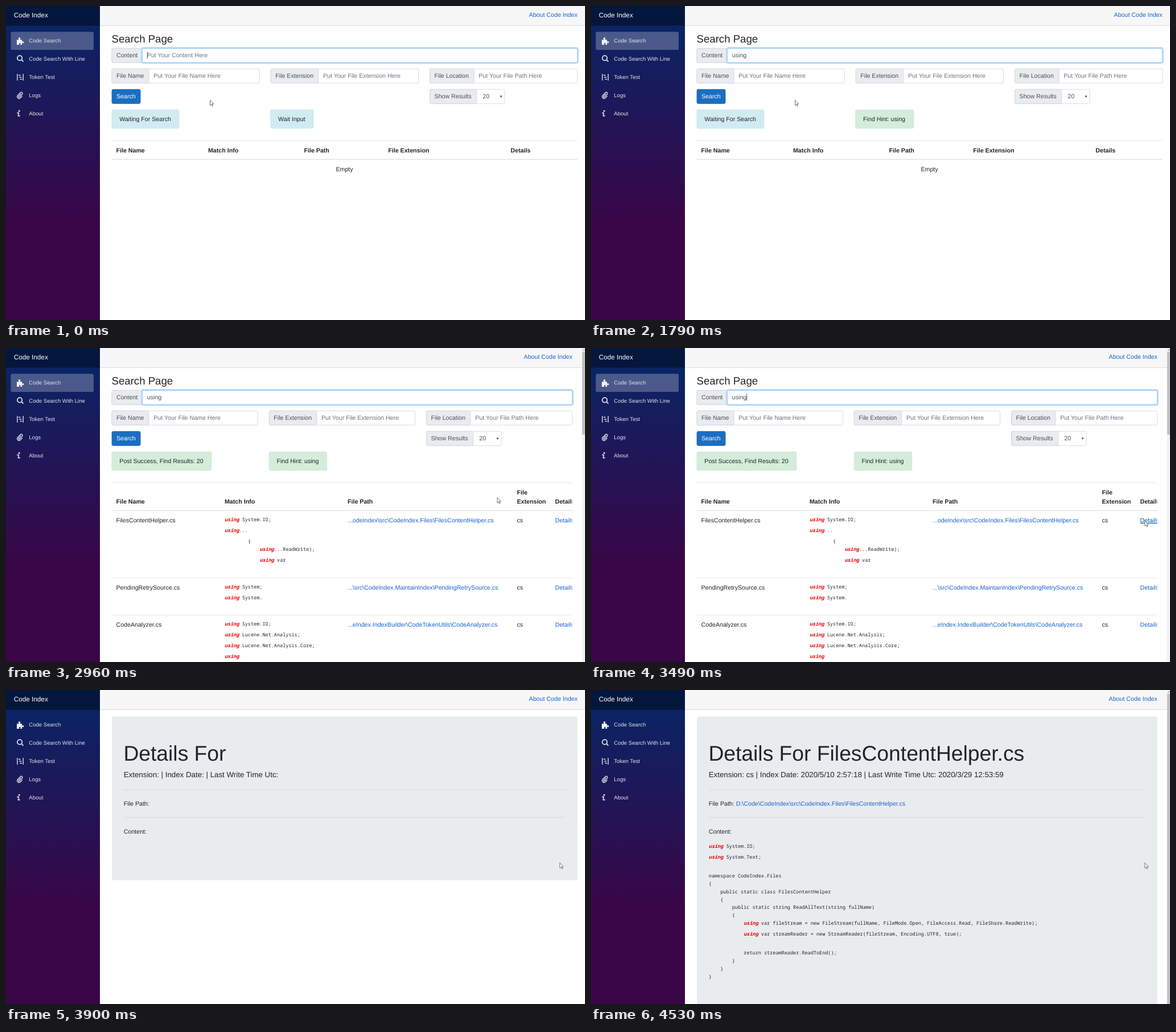
An HTML page that plays this animation: 1017x551 px, repeating every 5290 ms.

```html
<!DOCTYPE html>
<html lang="en">
<head>
<meta charset="utf-8">
<title>Code Index</title>
<style>
html, body { margin: 0; height: 100%; overflow: hidden; background: #fff; }
svg { display: block; width: 1017px; height: 551px; }
text { font: 10.65px "Liberation Sans", Arial, sans-serif; fill: #212529; white-space: pre; text-rendering: geometricPrecision; }
.mono { font: 8.53px "Noto Sans Mono", "DejaVu Sans Mono", monospace; }
.hit { font-weight: bold; font-style: italic; fill: #f00000; }
.bold { font-weight: bold; }
.link { fill: #1a62d0; }
.hint { fill: #6c757d; }
.label { fill: #495057; }
.white { fill: #fff; }
.nav { fill: #e4e2ea; }
</style>
</head>
<body>
<svg id="stage" viewBox="0 0 1017 551"></svg>
<script>
const SIDE = 165, LEFT = 186, WIDE = 1003.8, NARROW = 994.8, LOOP = 5290, SIZE = 10.65;
const $ = id => document.getElementById(id);

// y is the middle of the capitals; baselines sit on whole pixels
const text = (x, y, s, cls = '', size = SIZE, extra = '') =>
  `<text x="${x}" y="${Math.round(y + size * .36)}" class="${cls}" style="font-size:${size}px" ${extra}>${s}</text>`;
const rect = (x, y, w, h, fill, stroke = 'none', r = 0, extra = '') =>
  `<rect x="${x}" y="${y}" width="${w}" height="${h}" rx="${r}" fill="${fill}" stroke="${stroke}" stroke-width=".8" ${extra}/>`;
const rule = (x, y, end, color = '#dee2e6', h = .8) => rect(x, y - h / 2, end - x, h, color);
const group = (id, body, extra = '') => `<g id="${id}" ${extra}>${body}</g>`;

// "*" at the start of a line stands for the highlighted keyword
function code(x, y, indent, s) {
  const body = s[0] === '*' ? `<tspan class="hit">using</tspan>${s.slice(1)}` : s;
  return `<text class="mono" x="${x + indent * 5.118}" y="${Math.round(y + 3)}">${body}</text>`;
}

function field(x, y, end, labelWidth, label, hint) {
  return rect(x, y, end - x, 25, '#fff', '#ced4da', 2.4) +
    rect(x, y, labelWidth, 25, '#e9ecef', '#ced4da', 2.4) +
    text(x + 8, y + 12, label, 'label') +
    text(x + labelWidth + 8.2, y + 12, hint, 'hint');
}

function alertBox(x, w, s, ok) {
  return rect(x, 182.3, w, 32.4, ok ? '#d4edda' : '#d1ecf1', ok ? '#c3e6cb' : '#bee5eb', 2.4) +
    text(x + 13.3, 198.5, s);
}

function topBar(right) {
  return rect(SIDE, 0, 1017 - SIDE, 34.5, '#f7f7f7') + rule(SIDE, 34.6, 1017, '#d6d5d5') +
    text(right, 15.5, 'About Code Index', 'link', SIZE, 'text-anchor="end"');
}

function scrollBar(end) {
  return rect(1011.5, 0, 5.5, 551, '#f1f1f1') + rect(1012, 6.5, 5, end - 6.5, '#c1c1c1') +
    '<path d="M1013 4.2L1015.3 1.8L1017 3.8V4.2Z" fill="#a3a3a3"/>';
}

function searchPage(right) {
  const step = (right - LEFT + 20) / 3;
  const [a, b, c] = [0, 1, 2].map(i => LEFT + i * step);
  const w = step - 20;
  return topBar(right) + text(LEFT - .4, 57.5, 'Search Page', '', 18.6) +
    field(a, 74.3, right, 53.2, 'Content', '') +
    group('', rect(238.1, 73.2, right - 237, 27.2, 'none', '#bfdeff', 3.2, 'style="stroke-width:2.2"') +
      rect(239.2, 74.3, right - 239.2, 25, 'none', '#80bdff', 2.4), 'class="ring"') +
    field(a, 110.3, a + w, 65, 'File Name', 'Put Your File Name Here') +
    field(b, 110.3, b + w, 83.5, 'File Extension', 'Put Your File Extension Here') +
    field(c, 110.3, c + w, 77.5, 'File Location', 'Put Your File Path Here') +
    rect(a, 146.3, 50, 25, '#1b6ec2', '#1861ac', 2.4) + text(a + 8, 158.3, 'Search', 'white') +
    field(c, 146.3, c + 131.5, 82.2, 'Show Results', '') + text(c + 92.8, 158.3, '20', 'label') +
    `<path d="M${c + 123} 157.4h4l-2 3.4z" fill="#343a40"/>` +
    rule(LEFT, 236.6, right);
}

function heads(y, list) {
  return list.map(([x, s, dy = 0]) => text(x, y + dy, s, 'bold')).join('');
}

function homePage() {
  return searchPage(WIDE) + alertBox(LEFT, 117.7, 'Waiting For Search') +
    group('wait', alertBox(464.8, 75, 'Wait Input')) +
    group('found', alertBox(464.8, 101.6, 'Find Hint: using', true)) +
    heads(253, [[193.5, 'File Name'], [355, 'Match Info'], [523.5, 'File Path'], [671.3, 'File Extension'], [886.3, 'Details']]) +
    rule(LEFT, 269.2, WIDE, '#dee2e6', 1.3) + text(594.5, 286, 'Empty', '', SIZE, 'text-anchor="middle"');
}

function resultPage() {
  const rows = [
    [302, 'FilesContentHelper.cs', '...odeIndex\\src\\CodeIndex.Files\\FilesContentHelper.cs'],
    [420, 'PendingRetrySource.cs', '...\\src\\CodeIndex.MaintainIndex\\PendingRetrySource.cs'],
    [485, 'CodeAnalyzer.cs', '...eIndex.IndexBuilder\\CodeTokenUtils\\CodeAnalyzer.cs']
  ];
  const lines = [
    [301, 0, '* System.IO;'], [320, 0, '*...'], [339, 8, '{'], [353, 12, '*...ReadWrite);'], [372, 12, '* var'],
    [419, 0, '* System;'], [438, 0, '* System.'],
    [484, 0, '* System.IO;'], [503, 0, '* Lucene.Net.Analysis;'], [522, 0, '* Lucene.Net.Analysis.Core;'], [541, 0, '*']
  ];
  const details = rows.map(([y], i) => text(964.5, y, 'Details', 'link', SIZE, i ? '' : 'id="details"')).join('');
  return searchPage(NARROW) + alertBox(LEFT, 174.7, 'Post Success, Find Results: 20', true) +
    alertBox(462.2, 101.4, 'Find Hint: using', true) +
    heads(269, [[193.5, 'File Name'], [384, 'Match Info'], [600, 'File Path'], [897.5, 'File', -16], [897.5, 'Extension']]) +
    [[285.3, 1.3], [403.5, .8], [468.6, .8]].map(([y, h]) => rule(LEFT, y, NARROW, '#dee2e6', h)).join('') +
    rows.map(([y, name, path]) => text(193.5, y, name) + text(600, y, path, 'link') + text(897.5, y, 'cs')).join('') +
    lines.map(([y, n, s]) => code(384, y, n, s)).join('') +
    group('', heads(269, [[964.5, 'Details']]) + details, 'clip-path="url(#edge)"') + scrollBar(152);
}

function detailPage(right, bottom, name, info, path) {
  return topBar(right) + rect(LEFT, 46.5, right - LEFT, bottom - 46.5, '#e9ecef', 'none', 4) +
    text(206.4, 111, 'Details For ' + name, '', 37.25) + text(206.7, 148.5, info, '', 13.32) +
    rule(207, 175.2, right - 21.3, '#d0d4d7') + rule(207, 223.3, right - 21.3, '#d0d4d7') +
    text(206.8, 199, `File Path: <tspan class="link">${path}</tspan>`) + text(206.8, 248, 'Content:');
}

function sourceText() {
  return [
    [274, 0, '* System.IO;'], [293, 0, '* System.Text;'], [326, 0, 'namespace CodeIndex.Files'], [340, 0, '{'],
    [354, 4, 'public static class FilesContentHelper'], [368, 4, '{'],
    [381, 8, 'public static string ReadAllText(string fullName)'], [395, 8, '{'],
    [409, 12, '* var fileStream = new FileStream(fullName, FileMode.Open, FileAccess.Read, FileShare.ReadWrite);'],
    [428, 12, '* var streamReader = new StreamReader(fileStream, Encoding.UTF8, true);'],
    [461, 12, 'return streamReader.ReadToEnd();'], [475, 8, '}'], [489, 4, '}'], [503, 0, '}']
  ].map(([y, n, s]) => code(206.8, y, n, s)).join('');
}

function sidebar() {
  const items = ['Code Search', 'Code Search With Line', 'Token Test', 'Logs', 'About'];
  const line = (d, w) => `<path d="${d}" fill="none" stroke="#e4e2ea" stroke-width="${w}"/>`;
  return rect(0, 0, SIDE, 551, 'url(#side)') + rect(0, 0, SIDE, 34.6, 'rgba(0,0,0,.4)') +
    text(13.8, 16, 'Code Index', 'white', 11.73) +
    group('active', rect(8.4, 45.2, 145.6, 31.8, 'rgba(255,255,255,.25)', 'none', 2.6)) +
    items.map((s, i) => text(40.3, 61 + i * 31.95, s, 'nav', 9.58)).join('') +
    '<path d="M19 59.2h3.2c.6-1-.4-1.4-.4-2.4 0-2 3.6-2 3.6 0 0 1-1 1.4-.4 2.4h3.2v3.2c1 .6 1.2-.4 2-.4 1.6 0 1.6 3.2 0 3.2-.8 0-1-1-2-.4v3.2h-2.8c-.5-1 .3-1.1.3-1.9 0-1.4-2.8-1.4-2.8 0 0 .8.8.9.3 1.9H19z" fill="#f1eff5"/>' +
    line('M28.3 91.4a4.2 4.2 0 1 1-8.4 0a4.2 4.2 0 1 1 8.4 0M27.2 94.3L30.5 97.6', 1.8) +
    line('M19.9 119.3V130.7M30.2 119.3V130.7', 1.4) + line('M22 121.6h3.5M23.2 125h4M24.5 128.5h3.6', 1.5) +
    line('M26.4 153.8L22.2 158.2c-1.1 1.2.4 2.7 1.6 1.6l4.4-4.6c2.4-2.6-1-5.2-3.2-3l-4.1 4.3c-3.4 3.8 1.3 8 4.8 4.5l3-3.1', 1.3) +
    '<circle cx="23.1" cy="184.2" r="1.5" fill="#e4e2ea"/>' +
    line('M19.4 188.2c1-1.2 3.2-1.4 3 .4l-1 3.2c-.4 1.8 2 1.6 3.2 .2', 1.6);
}

$('stage').innerHTML = `<defs>
  <linearGradient id="side" x1="0" y1="0" x2="0" y2="1"><stop stop-color="#052767"/><stop offset=".7" stop-color="#3a0647"/></linearGradient>
  <clipPath id="edge"><rect width="${NARROW}" height="551"/></clipPath></defs>` +
  rect(0, 0, 1017, 551, '#fff') + sidebar() +
  group('home', homePage()) + group('results', resultPage()) +
  group('blank', detailPage(WIDE, 333.8, '', 'Extension: | Index Date: | Last Write Time Utc:', '')) +
  group('full', detailPage(NARROW, 580, 'FilesContentHelper.cs',
    'Extension: cs | Index Date: 2020/5/10 2:57:18 | Last Write Time Utc: 2020/3/29 12:53:59',
    'D:\\Code\\CodeIndex\\src\\CodeIndex.Files\\FilesContentHelper.cs') + sourceText() + scrollBar(551)) +
  group('entry', text(247.8, 86.3, '', '', SIZE, 'id="typed"') + rect(0, 80.3, .8, 12.2, '#333', 'none', 0, 'id="caret"')) +
  '<path id="pointer" d="M0 0V9.2L2.1 7.3L3.5 10.5L5 9.9L3.6 6.8H6.4Z" fill="#fff" stroke="#3a3a3a" stroke-width=".7"/>';

// each track: [start, value], held until the next start
const pages = [[0, 'home'], [1860, 'results'], [3900, 'blank'], [3980, 'full']];
const typing = [[0, ''], [530, 'u'], [700, 'us'], [930, 'usi'], [1010, 'usin'], [1230, 'using']];
const blink = [[0, 1], [460, 0], [530, 1], [1790, 0], [2320, 1], [2880, 0], [3410, 1], [3660, 0]];
const focus = [[0, 1], [3660, .8], [3730, .25], [3810, 0]];
const path = [[0, [358.5, 165.2]], [2550, [374, 168]], [2630, [440, 176]], [2710, [560, 195]], [2790, [690, 221]],
  [2880, [795, 245]], [2960, [863, 262.5]], [3030, [904, 284]], [3110, [938, 297]], [3190, [960, 304]],
  [3260, [970, 305.5]], [3340, [972.8, 304.5]], [3410, [972.8, 303.3]]];
const at = (track, t) => track.findLast(([start]) => start <= t)[1];
const show = (id, on) => { $(id).style.display = on ? '' : 'none'; };

function draw(now) {
  const t = now % LOOP, page = at(pages, t), searching = t < 3900;
  const word = at(typing, t), [x, y] = at(path, t);
  for (const [, id] of pages) show(id, id === page);
  show('active', searching);
  show('entry', searching);
  show('wait', t < 1080);
  show('found', t >= 1080);
  $('typed').textContent = word || 'Put Your Content Here';
  $('typed').setAttribute('class', word ? 'label' : 'hint');
  show('caret', at(blink, t));
  $('caret').setAttribute('x', 247.8 + (word && searching ? $('typed').getComputedTextLength() : 0));
  for (const ring of document.querySelectorAll('.ring')) ring.style.opacity = at(focus, t);
  const over = x > 964 && y > 296;
  $('details').style.textDecoration = over ? 'underline' : 'none';
  $('details').style.fill = over ? '#0056b3' : '';
  $('pointer').setAttribute('transform', `translate(${x} ${y})`);
}

const begin = performance.now();
function tick() {
  draw(performance.now() - begin);
  requestAnimationFrame(tick);
}
tick();
</script>
</body>
</html>
```
